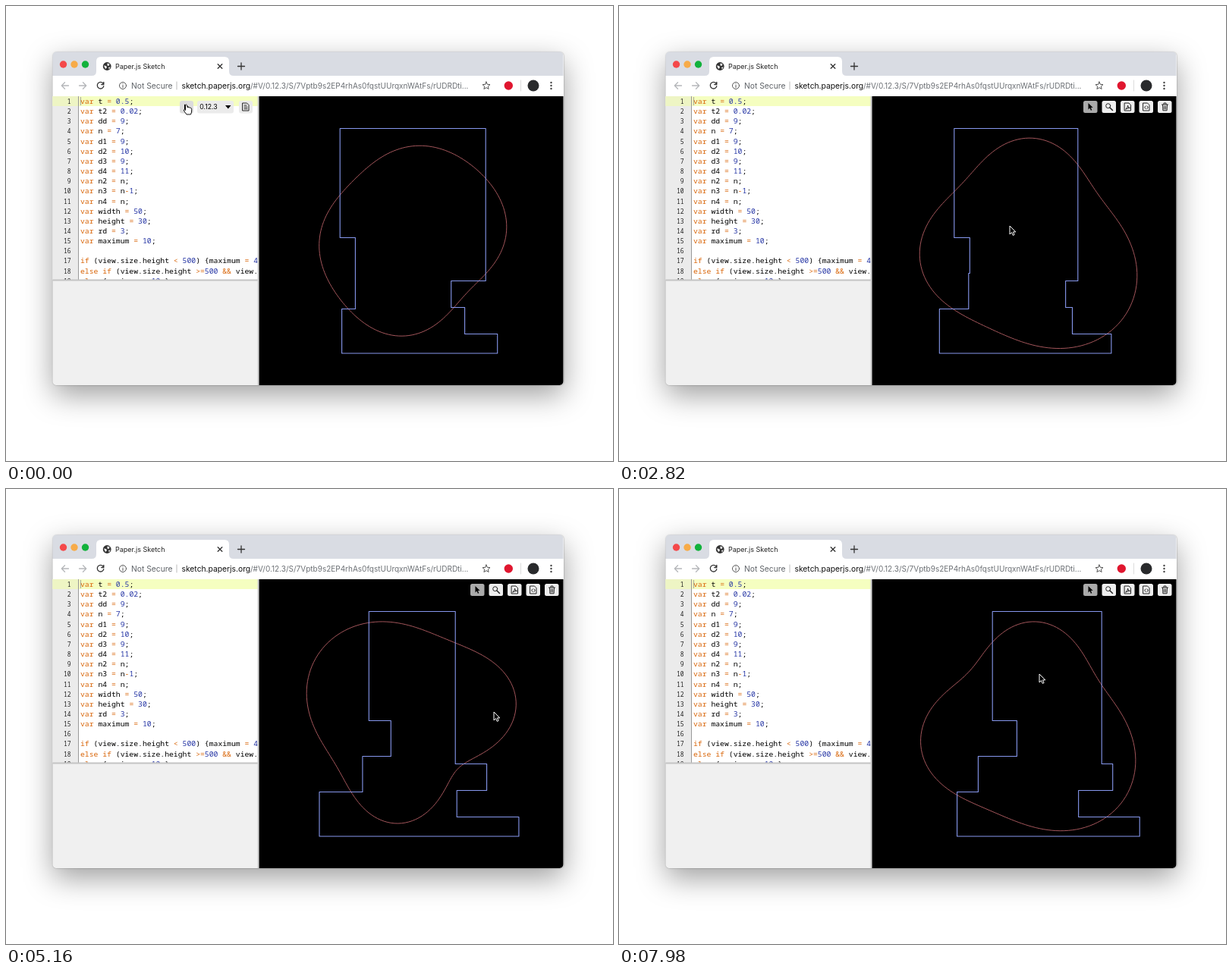
Write an HTML page that moves like this. It is 800 px wide and 600 px high and loops after 8 s.

```html
<!DOCTYPE html>
<html lang="en">
<head>
<meta charset="utf-8">
<title>Sketch in a browser window</title>
<style>
  html, body { margin: 0; width: 100%; height: 100%; overflow: hidden; background: #fff; }
  svg { position: relative; display: block; width: 800px; height: 600px; }
  .window { position: absolute; left: 61.5px; top: 60.5px; width: 673px; height: 439.5px; border-radius: 5px;
    box-shadow: 0 13px 38px rgba(0,0,0,.38), 0 0 2px rgba(0,0,0,.4); }
  text { font-family: Inter, sans-serif; white-space: pre; }
  .code text { font: 500 9.75px "Noto Sans Mono", monospace; fill: #000; }
  .code .num { font-size: 8px; text-anchor: end; fill: #222; }
  .code .key { fill: #d9660a; }
  .code .val { fill: #2434a4; }
  .line { fill: none; stroke-linecap: round; stroke-linejoin: round; }
</style>
</head>
<body>
<div class="window"></div>
<svg viewBox="0 0 800 600">
  <defs>
    <clipPath id="frame"><rect x="61.5" y="60.5" width="673" height="439.5" rx="5"/></clipPath>
    <clipPath id="editor"><rect x="62" y="119" width="270" height="242"/></clipPath>
  </defs>
  <g clip-path="url(#frame)">
    <rect x="61" y="60" width="675" height="32" fill="#d9dce3"/>
    <rect x="61" y="92" width="675" height="27" fill="#fff"/>
    <path d="M113 92q6 0 6-6V73q0-6 6-6H288q6 0 6 6V86q0 6 6 6Z" fill="#fff"/>
    <circle cx="75.5" cy="77" r="4.7" fill="#f4484a"/>
    <circle cx="90" cy="77" r="4.7" fill="#f7ab48"/>
    <circle cx="104.5" cy="77" r="4.7" fill="#12b23c"/>

    <circle cx="133.2" cy="79.5" r="5.4" fill="#333"/>
    <path d="M129 78.5l3 .5 1 2-2 2zM133.5 75.5l3 1-1 2.5-2-.5zM135 81l2.5-.5-1.5 3z" fill="#fff"/>
    <text x="144" y="82.7" font-size="9" fill="#222">Paper.js Sketch</text>
    <g class="line" stroke="#333" stroke-width="1.3">
      <path d="M279.2 76.7l5.6 5.6m0-5.6l-5.6 5.6M305.5 79.5h9m-4.5-4.5v9"/>
      <path d="M128 102a4.3 4.3 0 1 0 .8 3.7M128.8 100.5v3h-3"/>
      <path d="M82.5 105h-9m4-4.2l-4.2 4.2 4.2 4.2M96.5 105h9m-4-4.2l4.2 4.2-4.2 4.2" stroke="#b5b7ba"/>
    </g>
    <g class="line" stroke="#555">
      <circle cx="154" cy="105" r="4.5"/>
      <path d="M154 104.5v3M154 102.5v.1"/>
      <path d="M225 100v10" stroke="#bbb"/>
      <path d="M633 100l1.4 3.3 3.6.3-2.7 2.4.8 3.5-3.1-1.9-3.1 1.9.8-3.5-2.7-2.4 3.6-.3Z"/>
      <path d="M678.5 98v14" stroke="#ddd"/>
    </g>
    <text x="165" y="108.7" font-size="10.3" fill="#5f6368">Not Secure</text>
    <text x="231.5" y="108.7" font-size="10.3" fill="#111">sketch.paperjs.org</text>
    <text x="322" y="108.7" font-size="10" fill="#6c7075">/#V/0.12.3/S/7Vptb9s2EP4rhAs0fqstUUrqxnWAtFs/rUDRDti...</text>
    <circle cx="662.3" cy="105" r="5.7" fill="#e0162f"/>
    <circle cx="695" cy="105" r="7.5" fill="#292a2c"/>
    <path class="line" d="M718.5 101v.1m0 3.9v.1m0 3.9v.1" stroke="#444" stroke-width="2.4"/>

    <rect x="61" y="119" width="272" height="242" fill="#fff"/>
    <rect x="61" y="119" width="34" height="242" fill="#ebebeb"/>
    <rect x="61" y="119" width="272" height="13" fill="#f5fec0"/>
    <rect x="61" y="119" width="34" height="13" fill="#eef5c4"/>
    <rect x="95" y="119" width="1" height="242" fill="#999"/>
    <g class="code" id="code" clip-path="url(#editor)"></g>
    <path d="M98.5 120v11" stroke="#888" stroke-width=".7"/>
    <rect x="61" y="361" width="272" height="140" fill="#f0f0f0"/>
    <rect x="61" y="360.5" width="272" height="2" fill="#c4c4c4"/>
    <rect x="331.5" y="119" width="2" height="382" fill="#d0d0d0"/>
    <rect x="333.5" y="119" width="402" height="382"/>

    <g id="editorTools">
      <g fill="#ebebeb">
        <rect id="play" x="229" y="125" width="18" height="16.5" rx="3"/>
        <rect x="252" y="125" width="48" height="16.5" rx="3"/>
        <rect x="307" y="125" width="18" height="16.5" rx="3"/>
      </g>
      <path d="M235 129.5l6 3.5-6 3.5ZM289 131h7.5l-3.7 4.5Z"/>
      <text x="255.2" y="136.3" font-size="8.7">0.12.3</text>
      <path class="line" stroke="#222" d="M312 128h5.5l2.5 2.5V138h-8ZM314 131h3M314 133.3h4M314 135.6h4"/>
    </g>
    <g id="canvasTools">
      <g id="toolBoxes"></g>
      <path d="M618.5 128v8.5l2-1.9 1.4 3.2 1.4-.6-1.4-3.1h2.7Z"/>
      <g class="line" stroke="#222">
        <circle cx="644.7" cy="131.7" r="3"/><path d="M647 134l3.5 3.5" stroke-width="1.5"/>
        <path d="M666.5 128h5.5l2.5 2.5V138h-8ZM668 136q3-3 2.5-5 0 3 3 3.5-3-.3-5.5 1.5"/>
        <path d="M691 128h5.5l2.5 2.5V138h-8ZM694 132l-1.3 1.7 1.3 1.7M696 132l1.3 1.7-1.3 1.7"/>
        <path d="M715.5 130h8M718 129.5v-1.5h3v1.5M716.5 130.5l.4 7.3h5.2l.4-7.3M718.5 132v4M720.5 132v4"/>
      </g>
    </g>

    <path id="blob" class="line" stroke="#a2555a"/>
    <path id="tower" class="line" stroke="#8798ee" stroke-width="1.1"/>

    <g id="cursor" stroke-linejoin="round">
      <path id="arrow" d="M0 0V11L2.6 8.6 4.2 12.4 6.1 11.6 4.5 7.9H7.8Z" fill="#000" stroke="#fff"/>
      <path id="beam" class="line" d="M-2-5.5Q0-5.5 0-4Q0-5.5 2-5.5M0-4V4M-2 5.5Q0 5.5 0 4Q0 5.5 2 5.5M-1 .8H1" stroke="#222"/>
      <path id="hand" d="M-2.5-5.5q1.3-1.2 2 .3l.8 3 1.5-.3 1.5.6 1.3.2q1 .5 1.1 2.2L5.5 4 4.5 7H-1L-4 3-4.7 1q.8-1 2.2.6Z" fill="#fff" stroke="#111"/>
    </g>
  </g>
</svg>
<script>
const $ = id => document.getElementById(id);
const LOOP = 8000, STEP = 60;

const source = `var t = 0.5;
var t2 = 0.02;
var dd = 9;
var n = 7;
var d1 = 9;
var d2 = 10;
var d3 = 9;
var d4 = 11;
var n2 = n;
var n3 = n-1;
var n4 = n;
var width = 50;
var height = 30;
var rd = 3;
var maximum = 10;

if (view.size.height < 500) {maximum = 4;}
else if (view.size.height >=500 && view.size.height < 800)
else {maximum = 10;}`;

const paint = line => line
  .replace(/\b(var|if|else)\b|\b\d+(\.\d+)?\b|&&|[<>=-]+/g, token => {
    const kind = /^\d/.test(token) ? 'val' : 'key';
    const safe = token.replace(/&/g, '&amp;').replace(/</g, '&lt;');
    return `<tspan class="${kind}">${safe}</tspan>`;
  });

$('code').innerHTML = source.split('\n').map((line, i) => {
  const y = 129 + i * 13.15;
  return `<text class="num" x="85.5" y="${y}">${i + 1}</text><text x="98" y="${y}">${paint(line)}</text>`;
}).join('');

for (let i = 0; i < 5; i++) {
  $('toolBoxes').innerHTML +=
    `<rect x="${612 + 24.5 * i}" y="125" width="18.5" height="16" rx="2.5" fill="${i ? '#eee' : '#aaa'}"/>`;
}

const ramp = (t, from, to) => Math.min(1, Math.max(0, (t - from) / (to - from)));

// Eight spokes, clockwise from the right, each breathing as mean + swing * cos(phase - peak).
const side = { mean: 132, swing: 10, peak: 3.4 };
const pole = { mean: 130.5, swing: 6, peak: 3.1 };
const spokes = [
  side, { mean: 124, swing: 41, peak: 2.2 },
  pole, { mean: 125, swing: 6, peak: 1.9 },
  side, { mean: 126, swing: 38, peak: 4.3 },
  pole, { mean: 122.5, swing: 6.5, peak: 5.4 },
];

// Weight of a spoke at angular distance a: smooth interpolation around the circle.
function weight(a) {
  const n = spokes.length, half = Math.tan(a / 2);
  return Math.abs(half) < 1e-6 ? 1 : Math.sin(n * a / 2) / (n * half);
}

function blobPath(t) {
  const phase = Math.max(0, t - 770) * .00115;
  const radii = spokes.map(s => s.mean + s.swing * Math.cos(phase - s.peak));
  const points = [];
  for (let deg = 0; deg < 360; deg += 2) {
    const a = deg * Math.PI / 180;
    const r = radii.reduce((sum, radius, k) => sum + radius * weight(a - k * Math.PI / 4), 0);
    points.push((535.3 + r * Math.cos(a)).toFixed(2) + ' ' + (309.3 + r * Math.sin(a)).toFixed(2));
  }
  return 'M' + points.join('L') + 'Z';
}

// One set of edges opens and closes, the other slides to the right.
function towerPath(t) {
  const open = 40 * (1 - ramp(t, 1080, 3620) + 1.1 * ramp(t, 5280, 7980));
  const slide = ramp(t, 2720, 6050);
  const left = 440.2 + 52 * slide;
  return `M${left} 161.5H${592.2 + open}V362.5H${586.7 + 64 * slide}V397.5`
    + `H${594.2 + .26 * open}V432.5H${647.7 + 38.5 * slide}V458H${413 + .74 * open}V399.5`
    + `H${460.4 + 13 * slide}V352.5H${460.4 + 64 * slide}V305.5H${left}Z`;
}

const stops = [
  [0, 239, 136], [600, 239, 136], [1140, 326, 202], [2820, 515, 290],
  [3840, 435, 279], [5160, 643, 294], [6060, 499, 304], [7980, 554, 244],
];

function cursorAt(t) {
  const next = Math.max(1, stops.findIndex(([time]) => time >= t));
  const [t0, x0, y0] = stops[next - 1], [t1, x1, y1] = stops[next];
  const u = ramp(t, t0, t1), eased = u * u * (3 - 2 * u);
  return [x0 + (x1 - x0) * eased, y0 + (y1 - y0) * eased];
}

const show = (id, on) => $(id).style.display = on ? '' : 'none';

function draw(t) {
  $('blob').setAttribute('d', blobPath(t));
  $('tower').setAttribute('d', towerPath(t));

  const [x, y] = cursorAt(t);
  const onCanvas = x > 333;
  const onPlay = x > 229 && x < 247 && y > 125 && y < 142;
  $('cursor').setAttribute('transform', `translate(${x} ${y})`);
  $('play').setAttribute('fill', onPlay ? '#dcdcdc' : '#ebebeb');
  show('arrow', onCanvas);
  show('hand', onPlay);
  show('beam', !onCanvas && !onPlay);
  show('canvasTools', onCanvas);
  show('editorTools', !onCanvas);
}

const start = performance.now();
function tick() {
  const t = (performance.now() - start) % LOOP;
  draw(Math.floor(t / STEP) * STEP);
  requestAnimationFrame(tick);
}
tick();
</script>
</body>
</html>
```
